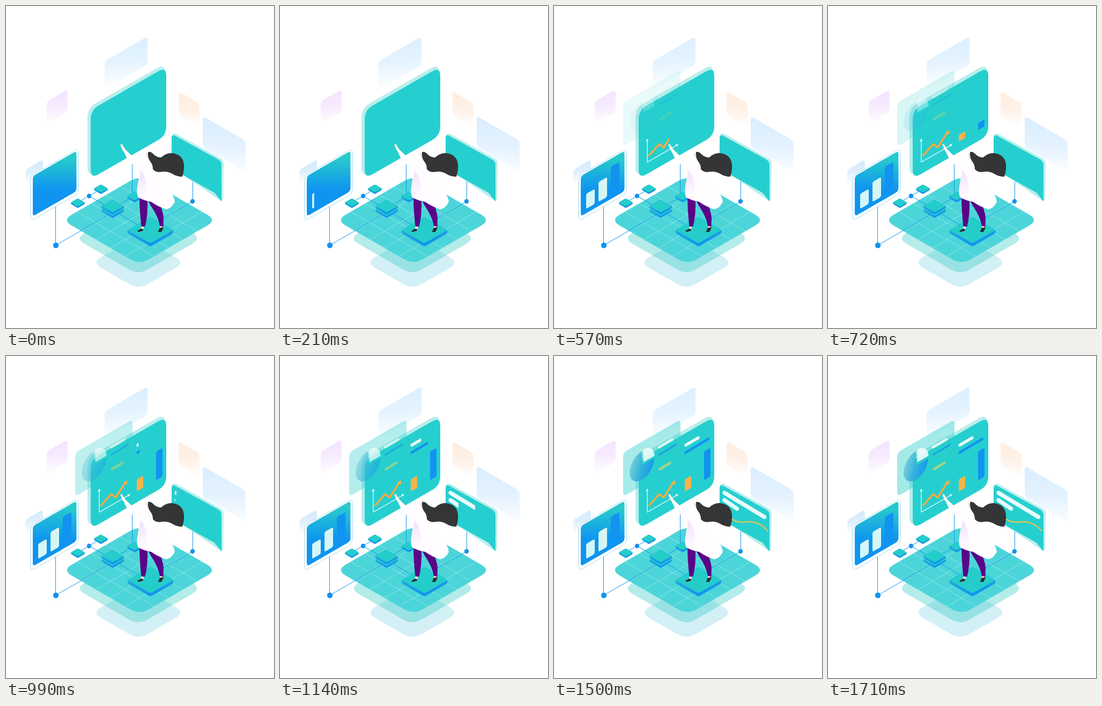
An HTML page with a canvas for the animation above (1.8 s loop, 500x600 px).

```html
<!DOCTYPE html>
<html lang="en">
<head>
<meta charset="utf-8">
<title>Isometric dashboard</title>
<style>
html, body { margin: 0; width: 100%; height: 100%; overflow: hidden; background: #fff; }
canvas { display: block; }
</style>
</head>
<body>
<canvas id="stage" width="500" height="600"></canvas>
<script>
const ctx = document.getElementById('stage').getContext('2d');
const TEAL = '#26cfcf', BLUE = '#1193f0', ORANGE = '#fab347', ISO = 0.577;

const ramp = (t, from, to) => Math.min(1, Math.max(0, (t - from) / (to - from)));
const easeInOut = u => u < 0.5 ? 2 * u * u : 1 - 2 * (1 - u) ** 2;
const easeOut = u => 1 - (1 - u) ** 2;

function gradient(x0, y0, x1, y1, ...colors) {
  const g = ctx.createLinearGradient(x0, y0, x1, y1);
  colors.forEach((c, i) => g.addColorStop(i / (colors.length - 1), c));
  return g;
}

function toward([ax, ay], [bx, by], d) {
  const k = Math.min(0.5, d / (Math.hypot(bx - ax, by - ay) || 1));
  return [ax + (bx - ax) * k, ay + (by - ay) * k];
}

// Polygon with softened corners
function poly(points, radius, fill, stroke) {
  const n = points.length;
  ctx.beginPath();
  points.forEach((p, i) => {
    ctx.lineTo(...toward(p, points[(i + n - 1) % n], radius));
    ctx.quadraticCurveTo(...p, ...toward(p, points[(i + 1) % n], radius));
  });
  ctx.closePath();
  if (fill) { ctx.fillStyle = fill; ctx.fill(); }
  if (stroke) { ctx.strokeStyle = stroke; ctx.lineWidth = 1; ctx.stroke(); }
}

// Upright panel: top-left corner, width, height, rise of the top edge per pixel
const panel = (x, y, w, h, slope = -ISO) =>
  [[x, y], [x + w, y + w * slope], [x + w, y + w * slope + h], [x, y + h]];
const diamond = (x, y, w, h = w * ISO) => [[x, y - h], [x + w, y], [x, y + h], [x - w, y]];

function shape(d, fill) {
  ctx.fillStyle = fill;
  ctx.fill(new Path2D(d));
}

function line(points, color, width, cap = 'butt') {
  ctx.beginPath();
  points.forEach(p => ctx.lineTo(...p));
  ctx.strokeStyle = color;
  ctx.lineWidth = width;
  ctx.lineCap = cap;
  ctx.lineJoin = 'round';
  ctx.stroke();
}

// Reveals a drawing from left to right
function wipe(x, width, u, draw) {
  if (u <= 0) return;
  ctx.save();
  ctx.beginPath();
  ctx.rect(x, 0, width * u, 600);
  ctx.clip();
  draw();
  ctx.restore();
}

function wipeBar(x0, y0, x1, y1, width, color, u = 1) {
  wipe(x0 - width / 2, x1 - x0 + width, u, () => line([[x0, y0], [x1, y1]], color, width, 'round'));
}

function dot(x, y, r, color) {
  ctx.beginPath();
  ctx.arc(x, y, r, 0, 7);
  ctx.fillStyle = color;
  ctx.fill();
}

function slab(x, y, w, depth, r = 2) {
  const side = gradient(x - w, y, x + w, y, '#22a9dc', BLUE, '#1c9ce4');
  const h = w * ISO;
  poly([[x - w, y], [x, y - h], [x + w, y], [x + w, y + depth], [x, y + h + depth], [x - w, y + depth]], r, side);
  poly(diamond(x, y, w), r, '#25cdca');
}

function fadingPanel(x, y, w, h, slope, rgb) {
  const top = y + Math.min(0, w * slope);
  const end = y + Math.max(0, w * slope) + h;
  poly(panel(x, y, w, h, slope), 7, gradient(x, top, x + w * slope * -0.2, end,
    `rgba(${rgb},1)`, `rgba(${rgb},.7)`, `rgba(${rgb},0)`));
}

function drawBackdrop() {
  fadingPanel(184, 103, 80, 53, -ISO, '217,238,255');
  fadingPanel(76, 178, 39, 42, -ISO, '243,226,255');
  fadingPanel(322, 159, 39, 44, ISO, '255,236,222');
  fadingPanel(367, 205, 80, 58, ISO, '217,237,255');
  fadingPanel(36, 305, 33, 27, -ISO, '208,233,251');
}

function drawFloor() {
  poly(diamond(247, 478, 87, 50), 20, 'rgba(60,190,215,.23)');
  poly(diamond(247, 433, 118, 68), 20, 'rgba(60,205,200,.38)');
  poly(diamond(249, 399, 144, 83), 20, '#4cd5d9');
  ctx.save();
  ctx.clip();
  for (let i = 1; i < 5; i++) {
    const dx = 27 * i, dy = dx * ISO;
    const faint = 'rgba(255,255,255,.45)';
    line([[249 - dx, 482 - dy], [393 - dx, 399 - dy]], faint, 0.8);
    line([[249 + dx, 482 - dy], [105 + dx, 399 - dy]], faint, 0.8);
  }
  ctx.restore();

  [[[92.5, 373], [92.5, 446], [190, 390]], [[134, 366], [177, 341]], [[155, 354], [185, 371]],
   [[235.5, 285], [235.5, 352]], [[214, 368], [240, 354]], [[212, 388], [248, 409]],
   [[348.5, 320], [348.5, 364], [288, 398]]].forEach(p => line(p, BLUE, 1));
  dot(93, 446, 5.2, BLUE);
  dot(155, 354, 4.2, BLUE);
  dot(348, 364, 4.2, BLUE);

  slab(134, 366, 13, 3);
  slab(177, 340, 13, 3);
  slab(240, 354, 14, 4);
  slab(199, 379, 21, 4);
  slab(199, 372.5, 21, 4);
  slab(269.5, 417.5, 43, 6, 3);
}

function drawLeftScreen(t) {
  poly(panel(45.5, 317, 90, 84), 10, '#fff', '#a6dcf0');
  poly(panel(50, 317, 81.5, 75), 6, gradient(0, 285, 0, 342, '#27c9cc', '#0f95f0'));
  wipe(48, 76, easeInOut(ramp(t, 120, 400)), () => {
    poly(panel(60, 350, 16, 28), 3, '#d6f6f6');
    poly(panel(83, 328, 16, 37), 3, '#d6f6f6');
    poly(panel(106, 300, 16, 50), 3, BLUE);
  });
}

function drawTrend(t) {
  ctx.globalAlpha = ramp(t, 360, 540);
  line([[174, 250], [174, 291], [229, 259.5]], '#fff', 1.2);
  poly([[174, 247], [176.5, 252], [171.5, 252]], 0, '#fff');
  poly([[232, 257.5], [229, 262], [226.5, 258]], 0, '#fff');
  ctx.globalAlpha = 1;

  wipe(174, 54, ramp(t, 360, 640), () => {
    const points = [[177.5, 278.5], [196.5, 257], [204.5, 264], [223, 235]];
    line(points, '#e8953f', 3.4, 'round');
    line(points, ORANGE, 2.4, 'round');
    poly([[225.5, 231.5], [226, 239.5], [219, 236]], 0, ORANGE);
  });
}

function drawMainScreen(t) {
  poly([[152, 190], [297, 107], [299, 235], [152, 319]], 18, '#b9eeec');
  poly([[158, 194], [299, 113], [299, 241], [158, 322]], 17, TEAL);
  drawTrend(t);

  const column = (x, base, full, u, color) => {
    if (u > 0) poly(panel(x, base - full * u, 12, full * u), 2.5, color);
  };
  column(244, 252.5, 22.5, ramp(t, 570, 850), ORANGE);
  column(280, 231.5, 53.5, ramp(t, 640, 960), BLUE);
  const u = ramp(t, 955, 1220);
  wipeBar(246, 166, 269, 152.5, 5.5, '#eefcfc', u);
  wipeBar(245.5, 180, 288, 154.5, 4.5, BLUE, u);
}

function drawGlass(t) {
  const shown = easeOut(ramp(t, 390, 1710));
  ctx.globalAlpha = shown;
  poly(panel(129, 180, 107, 82), 8, 'rgba(38,205,200,.42)');
  ctx.save();
  ctx.transform(0.866, -0.5, 0, 1, 164, 204);
  ctx.beginPath();
  ctx.moveTo(0, 0);
  ctx.arc(0, 0, 26.5, 0, Math.PI * 1.5);
  ctx.globalAlpha = shown * ramp(t, 300, 1500);
  ctx.fillStyle = gradient(-26, -10, 22, 8, '#77cfd8', '#38b4dd', '#1b9cea');
  ctx.fill();
  ctx.globalAlpha = shown;
  ctx.beginPath();
  ctx.moveTo(3, -4.5);
  ctx.arc(3, -4.5, 24, -Math.PI / 2, 0);
  ctx.fillStyle = 'rgba(240,252,252,.9)';
  ctx.fill();
  ctx.restore();
  wipeBar(196, 170, 221, 155.5, 4.5, '#e2f8f8');
  wipeBar(196, 184, 228, 165, 3, '#1b9fe4');
  wipeBar(197.5, 211, 217, 199, 4.5, '#a2d588');
  ctx.globalAlpha = 1;
}

function drawRightScreen(t) {
  shape('M309 246Q309 236 317 238L399 283Q406 287 406 293L405 360L402 364L309 300Z', '#b9eeec');
  shape('M309 247Q309 238 316 242L396 286Q402 290 402 296V364L389 348L312 305Q309 303 309 298Z', TEAL);
  const u = ramp(t, 978, 1245);
  wipeBar(318, 255, 392.5, 300, 7.5, '#e9fbfb', u);
  wipeBar(318, 268.5, 341.5, 284.5, 7.5, '#e9fbfb', u);
  wipe(326, 74, ramp(t, 1180, 1320), () => {
    ctx.strokeStyle = '#d8c55a';
    ctx.lineWidth = 2.5;
    ctx.lineCap = 'round';
    ctx.stroke(new Path2D('M329 301C339 311 350 310 362 309S388 313 398 325.5'));
  });
}

function drawWoman() {
  const purple = '#5a0587', dark = '#2b2c30', skin = '#fbded6';
  shape('M252 410H257V418H252ZM287 409L293 408L292 416H287Z', skin);
  shape('M249 355L264 360Q265 390 259.5 411L252.5 411Q249 380 249 355Z', purple);
  shape('M263 359L284 363Q292 378 294 394L293.5 411L287 410Q284 392 270 372Z', purple);
  shape('M245 419L252 415L257 416L255 419L247 421Z', dark);
  shape('M283.5 421L287 413Q291 414 293 411L293.5 414L290 421Z', dark);
  shape('M213 258L216 257L222 266L218 270Z', '#fdeae5');
  shape('M260 276Q264 271 268 277L269 288H261Z', skin);
  shape('M217.5 262.5L238 282Q250 285 261 276Q263 284 269 288L273 302Q277 312 278 320Q292 332 304 345' +
    'Q314 353 315 365Q309 377 299 379Q282 373 271 365Q256 362 247 357Q243 350 245 338L250 306' +
    'Q238 299 227.5 287.5L218 268Z', '#fffdff');
  shape('M251 306Q262 318 263 338Q263 352 258 360L249 357Q244 350 246 338Z',
    gradient(248, 306, 262, 350, '#f2dffb', '#fdf9ff'));
  shape('M265 272Q271 271 276 277Q283 283 290 282Q298 274 309 274Q324 275 330 287Q335 300 329 318' +
    'Q318 318 309 312Q300 307 290 309Q279 311 274 304Q274 296 270 291Q264 284 265 272Z', '#333537');
}

function frame(now) {
  const t = Math.min(1710, Math.floor(now % 1800 / 30) * 30);
  ctx.clearRect(0, 0, 500, 600);
  drawBackdrop();
  drawFloor();
  drawRightScreen(t);
  drawMainScreen(t);
  drawGlass(t);
  drawLeftScreen(t);
  drawWoman();
  requestAnimationFrame(frame);
}
frame(0);
</script>
</body>
</html>
```
